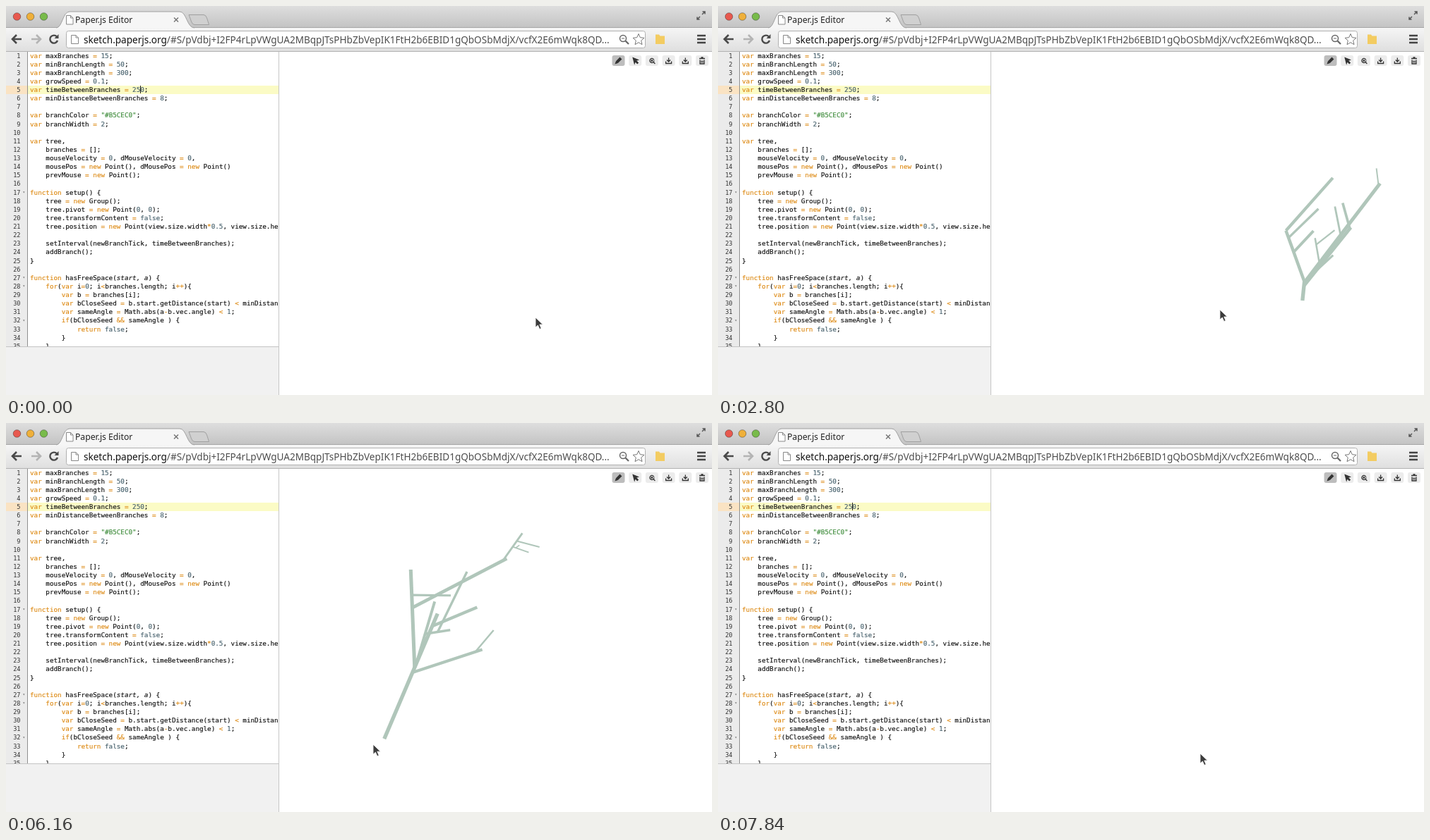
Recreate the animation shown at these times as an HTML page with a canvas. Size 1000 by 552 pixels, loop 7.86 s.

```html
<!DOCTYPE html>
<html lang="en">
<head>
<meta charset="utf-8">
<title>Paper.js Editor</title>
<style>
html, body { margin: 0; width: 100%; height: 100%; overflow: hidden; background: #fff; }
#stage { position: relative; width: 1000px; height: 552px; overflow: hidden; }
#stage > * { position: absolute; }
#editor { left: 0; top: 64px; width: 386px; height: 419px; overflow: hidden; }
#editor > * { position: absolute; margin: 0; font: 9.28px/12.12px "DejaVu Sans Mono", monospace; }
#gutter { left: 0; top: 0; width: 30px; height: 419px; background: #ebebeb; border-right: 1px solid #8f8f8f; }
#line { top: 48.5px; left: 31px; width: 355px; height: 12.1px; background: #fbfbc5; }
#lineMark { top: 48.5px; left: 0; width: 30px; height: 12.1px; background: #fae3c3; }
#numbers { left: 0; top: .5px; width: 20.5px; text-align: right; color: #333; font-size: 8.6px; }
#code { left: 34px; top: .5px; color: #111; -webkit-text-stroke: .15px; }
#code b { font-weight: normal; color: #dd8a14; }
#code u { text-decoration: none; color: #46606c; }
#code s { text-decoration: none; color: #3d8b3a; }
#caret { left: 190px; top: 49px; width: 1.3px; height: 11px; background: #222; }
#editor .fold { left: 23.5px; font-size: 6px; color: #777; }
#console { left: 0; top: 483px; width: 386px; height: 69px; background: #f1f1f1; box-shadow: inset 0 1px #c4c4c4; }
#divider { left: 386px; top: 65px; width: 1px; height: 487px; background: #c6c6c6; }
svg, canvas { left: 0; top: 0; }
#cursor { overflow: visible; }
</style>
</head>
<body>
<div id="stage">
  <div id="editor">
    <div id="gutter"></div><div id="line"></div><div id="lineMark"></div>
    <pre id="numbers"></pre><pre id="code"></pre><div id="caret"></div>
  </div>
  <div id="console"></div>
  <div id="divider"></div>
  <svg width="1000" height="100" font-family="'Noto Sans', sans-serif">
    <defs>
      <linearGradient id="strip" x2="0" y2="1"><stop stop-color="#dedede"/><stop offset="1" stop-color="#c3c3c3"/></linearGradient>
      <linearGradient id="bar" x2="0" y2="1"><stop stop-color="#f6f6f6"/><stop offset="1" stop-color="#dfdfdf"/></linearGradient>
    </defs>
    <rect width="1000" height="31" fill="url(#strip)"/>
    <rect y="30" width="1000" height="34" fill="url(#bar)"/>
    <path d="M0 30.5H1000" stroke="#a5a5a5"/>
    <path d="M0 64.5H1000" stroke="#b2b2b2"/>
    <path d="M71 31C80 31 80 8 90 8H246C256 8 256 31 267 31" fill="#f6f6f6" stroke="#a0a0a0"/>
    <path d="M259 12.5H280Q283 12.5 284.5 17L287.5 26.5H267Q264 26.5 262.5 22Z" fill="#d0d0d0" stroke="#a0a0a0"/>
    <g id="lights" stroke="#0005"></g>
    <path d="M85.5 13.5H91.5L95 17V26H85.5ZM91.5 13.5V17H95" fill="#fff" stroke="#8a8a8a"/>
    <text x="98" y="24" font-size="12.2" fill="#222">Paper.js Editor</text>
    <path d="M238 16.5l6 6m0-6l-6 6" stroke="#777" stroke-width="1.5"/>
    <g stroke="#555" fill="none">
      <path d="M979 19l4-4M979 15.5V19H982.5M986 12l4-4M986.5 8H990V11.5" stroke-width="1.5"/>
      <path d="M22 47H9.500M15 41L9 47L15 53" stroke="#4a4a4a" stroke-width="2.6"/>
      <path d="M36 47H48.5M43 41L49 47L43 53" stroke="#b4b4b4" stroke-width="2.6"/>
      <path d="M72 43.5A5.5 5.5 0 1 0 73 49" stroke="#4a4a4a" stroke-width="2.4"/>
      <path d="M74.5 40V46H68.5Z" fill="#4a4a4a" stroke="none"/>
    </g>
    <rect x="85.5" y="35.5" width="820" height="24" rx="3" fill="#fff" stroke="#b0b0b0"/>
    <path d="M92.5 41.5H99L102.5 45V53.5H92.5ZM99 41.5V45H102.5" fill="#fff" stroke="#888"/>
    <text x="110" y="52.5" font-size="13.56" fill="#4d4d4d"><tspan fill="#111">sketch.paperjs.org</tspan>/#S/pVdbj+I2FP4rLpVWgUA2MBqpJTsPHbZbVepIK1FtH2b6EBID1gQbOSbMdjX/vcfX2E6mWqk8QD...</text>
    <g fill="none" stroke="#666">
      <circle cx="874" cy="46" r="4.5" stroke-width="1.5"/>
      <path d="M877.5 49.5L882 54" stroke-width="2.2"/><path d="M872 46H876"/>
      <path d="M896 39.5l2.3 5.200 5.700.6-4.300 3.800 1.300 5.600-5-3-5 3 1.300-5.600-4.300-3.800 5.700-.6Z" fill="#fff" stroke="#777"/>
      <path d="M979 42H991M979 47H991M979 52H991" stroke="#444" stroke-width="2.4"/>
    </g>
    <path d="M920 40.5H925L926.5 42.5H933V54H920Z" fill="#f3cc62"/>
    <g id="tools"></g>
  </svg>
  <canvas id="paper" width="1000" height="552"></canvas>
  <svg id="cursor" width="12" height="18"><path d="M0 0V14L3.4 11 5.8 16.5 8.2 15.5 5.8 10H10.4Z" fill="#3c3c3c" stroke="#fff" stroke-width=".8"/></svg>
</div>
<script>
const $ = id => document.getElementById(id);
const LOOP = 7860, ROW = 12.12;

const source = `var maxBranches = 15;
var minBranchLength = 50;
var maxBranchLength = 300;
var growSpeed = 0.1;
var timeBetweenBranches = 250;
var minDistanceBetweenBranches = 8;

var branchColor = "#B5CEC0";
var branchWidth = 2;

var tree,
    branches = [];
    mouseVelocity = 0, dMouseVelocity = 0,
    mousePos = new Point(), dMousePos = new Point()
    prevMouse = new Point();

function setup() {
    tree = new Group();
    tree.pivot = new Point(0, 0);
    tree.transformContent = false;
    tree.position = new Point(view.size.width*0.5, view.size.height);

    setInterval(newBranchTick, timeBetweenBranches);
    addBranch();
}

function hasFreeSpace(start, a) {
    for(var i=0; i<branches.length; i++){
        var b = branches[i];
        var bCloseSeed = b.start.getDistance(start) < minDistanceBetweenBranches;
        var sameAngle = Math.abs(a-b.vec.angle) < 1;
        if(bCloseSeed && sameAngle ) {
            return false;
        }
    }`;

const escapeHtml = s => s.replace(/&/g, '&amp;').replace(/</g, '&lt;');
const token = /("[^"]*")|\b(?:var|function|new|return|for|if)\b|\b(\d[\d.]*|false)\b|((?<=Space\()[^)]+)|[=*<&+-]+/g;
$('code').innerHTML = source.replace(token, (m, string, value, params) => {
  const tag = string ? 's' : value ? 'u' : params ? 'i' : 'b';
  return `<${tag}>${escapeHtml(m)}</${tag}>`;
});
const lines = source.split('\n');
$('numbers').textContent = lines.map((_, i) => i + 1).join('\n');
lines.forEach((text, i) => {
  if (/^\s*(function|for|if)\b/.test(text)) {
    $('editor').insertAdjacentHTML('beforeend', `<span class="fold" style="top:${i * ROW}px">▾</span>`);
  }
});

$('lights').innerHTML = ['#e8594f', '#efb03a', '#78bb4a'].map((color, i) =>
  `<circle cx="${15.5 + i * 19}" cy="15" r="5.3" fill="${color}"/>`).join('');

const download = 'M0-4V1M-2.5-1L0 1.5 2.5-1M-4 1V4H4V1';
const icons = [
  'M-4 4L-3 1 2-4 4-2-1 3Z',
  'M-3-4L4-1 1 0 4 3 3 4 0 1-1 4Z',
  'M3 0A3 3 0 1 1 2.9-.8M2 2L4.5 4.5M-1.5 0H1.5M0-1.5V1.5',
  download, download,
  'M-4-3H4M-1.5-4.5H1.5M-3-1V4.5H3V-1M-1 0V3M1 0V3'
];
$('tools').innerHTML = icons.map((d, i) => `<g transform="translate(${867.5 + i * 23.7} 77.5)">
  <rect x="-9" y="-7.5" width="18" height="15" rx="3" fill="${i ? '#ececec' : '#bdbdbd'}"/>
  <path d="${d}" fill="${i < 2 ? '#333' : 'none'}" stroke="#333" stroke-width="1.3"/></g>`).join('');

// Turning points of the mouse: time, x, y
const mousePath = [
  [1900, 750, 442], [2050, 664, 438], [2240, 530, 455], [2700, 828, 418], [2880, 630, 440], [3080, 744, 422],
  [5840, 744, 422], [6090, 522, 452], [6170, 520, 457], [6360, 660, 516], [6560, 825, 490], [6840, 683, 469]
];

// Smooth curve through the points that never overshoots
function mouseAt(time) {
  const keys = mousePath, last = keys.length - 1;
  const t = Math.max(keys[0][0], Math.min(time, keys[last][0]));
  const i = Math.max(0, keys.findIndex(key => key[0] >= t) - 1);
  const [a, b] = [keys[i], keys[i + 1]], span = b[0] - a[0], u = (t - a[0]) / span;
  return [1, 2].map(c => {
    const slope = j => j < 0 || j >= last ? 0 : (keys[j + 1][c] - keys[j][c]) / (keys[j + 1][0] - keys[j][0]);
    const tangent = j => {
      const p = slope(j - 1), q = slope(j);
      return p * q > 0 ? 2 * p * q / (p + q) : 0;
    };
    return a[c] + (b[c] - a[c]) * u * u * (3 - 2 * u)
      + span * u * (1 - u) * ((1 - u) * tangent(i) - u * tangent(i + 1));
  });
}

// Branch: parent, position on parent, length (twigs get a length by age).
// A branch leans to the other side than its parent; "left" names those on the trunk that lean left.
const trees = [
  { start: 20, end: 3300, angle: -93, left: [3], branches: [
    [-1, 0, 27], [0, .95, 177], [0, .78, 106], [0, 1, 77], [3, 1, 100], [3, .58, 41], [2, .98, 38], [3, .86, 59],
    [0, 1], [2, .8], [2, .34], [10, .75], [1, .98]
  ] },
  { start: 3385, end: 7700, angle: -96, left: [1, 5], branches: [
    [-1, 0, 193], [0, .57, 139], [1, .61, 151], [0, .9, 69], [0, .53, 104], [0, .6, 92], [5, .48, 36], [6, .5, 95],
    [1, .74], [2, .96], [4, .9], [9, .71], [9, .5], [12, .15]
  ] }
];
const INTERVAL = 210, LEAN = 30, FOLLOW_LAG = 107, WIND_LAG = 240;

const ctx = $('paper').getContext('2d');
ctx.beginPath();
ctx.rect(387, 65, 613, 487);
ctx.clip();
ctx.strokeStyle = '#b0c6ba';

function drawTree({ start, angle, left, branches }, t) {
  const wind = (mouseAt(t - WIND_LAG)[0] - mouseAt(t)[0]) / 123;
  const placed = [];
  branches.forEach(([parent, at, length = 185 * .86 ** i_(placed)], i) => {
    const age = (t - start - i * INTERVAL) / 1000;
    if (age <= 0) return;
    const base = placed[parent];
    const from = base ? base.from.map((p, k) => p + base.vec[k] * at) : mouseAt(t - FOLLOW_LAG);
    const side = !base ? 0 : parent ? -base.side : left.includes(i) ? -1 : 1;
    const bend = wind * (21 + 3.4 * i);
    const a = (angle + LEAN * side + bend) * Math.PI / 180;
    const vec = [Math.cos(a) * length, Math.sin(a) * length];
    const grown = 1 - Math.exp(-6.2 * age);
    placed[i] = { from, vec, side };
    ctx.lineWidth = 1.6 + 1.35 * age;
    ctx.beginPath();
    ctx.moveTo(...from);
    ctx.lineTo(from[0] + vec[0] * grown, from[1] + vec[1] * grown);
    ctx.stroke();
  });
}

function i_(list) { return list.length; }

function render(now) {
  const t = now % LOOP;
  ctx.clearRect(0, 0, 1000, 552);
  const tree = trees.find(({ start, end }) => t >= start && t < end);
  if (tree) drawTree(tree, t);
  const [x, y] = t < mousePath[0][0] ? mousePath[0].slice(1) : mouseAt(t);
  $('cursor').style.transform = `translate(${x}px, ${y}px)`;
  $('caret').style.visibility = t < 100 || t > 7500 ? 'visible' : 'hidden';
}

const begun = performance.now();
(function frame() {
  render(performance.now() - begun);
  requestAnimationFrame(frame);
})();
</script>
</body>
</html>
```
